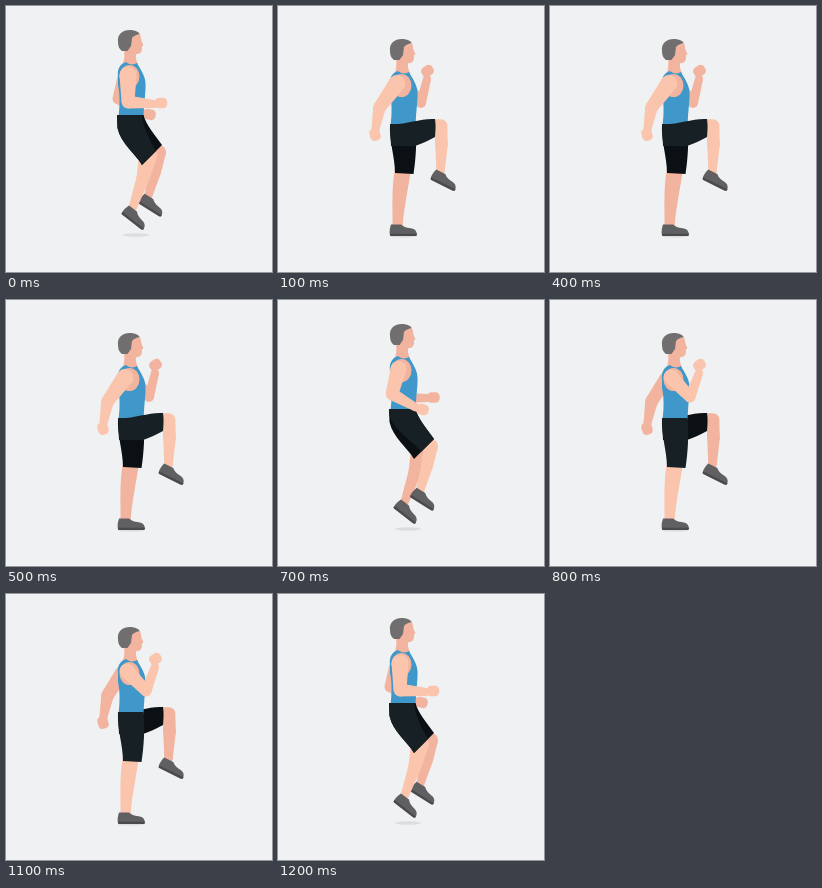
Write an HTML page with a canvas that moves like this. It is 266 by 266 pixels and loops after 1.3 s.

```html
<!DOCTYPE html>
<html lang="en">
<head>
<meta charset="utf-8">
<title>High knees</title>
<style>
  html, body { margin: 0; width: 100%; height: 100%; overflow: hidden; background: #f0f1f3; }
  canvas { display: block; width: 100vw; height: 100vh; }
</style>
</head>
<body>
<canvas id="stage"></canvas>
<script>
const SIZE = 266, LOOP = 1300;
const canvas = document.getElementById('stage');
const ctx = canvas.getContext('2d');
const C = {
  bg: '#f0f1f3', skin: '#fac4ad', farSkin: '#f2b49e', hair: '#706e6f',
  vest: '#3f98c9', shorts: '#162025', farShorts: '#0a1013',
  shoe: '#605f62', sole: '#4a494c', shadow: '#dcdddf'
};

function fill(d, color) {
  ctx.fillStyle = color;
  ctx.fill(new Path2D(d));
}

function disc(x, y, rx, ry, color) {
  ctx.fillStyle = color;
  ctx.beginPath();
  ctx.ellipse(x, y, rx, ry, 0, 0, Math.PI * 2);
  ctx.fill();
}

// Tapered limb through joints [x, y, radius]
function limb(joints, color) {
  joints.forEach(([x, y, r], i) => {
    disc(x, y, r, r, color);
    if (!i) return;
    const [px, py, pr] = joints[i - 1];
    const a = Math.atan2(y - py, x - px);
    const nx = -Math.sin(a), ny = Math.cos(a);
    ctx.beginPath();
    ctx.moveTo(px + nx * pr, py + ny * pr);
    ctx.lineTo(x + nx * r, y + ny * r);
    ctx.lineTo(x - nx * r, y - ny * r);
    ctx.lineTo(px - nx * pr, py - ny * pr);
    ctx.fill();
  });
}

function fist(x, y, color, turn = 0) {
  ctx.save();
  ctx.translate(x, y);
  ctx.rotate(turn);
  ctx.fillStyle = color;
  ctx.beginPath();
  ctx.roundRect(-6.2, -5.3, 12.4, 10.6, 4.2);
  ctx.fill();
  ctx.restore();
}

// Shoe with its heel at (x, y), toe pointing right before turning
function shoe(x, y, turn) {
  ctx.save();
  ctx.translate(x, y);
  ctx.rotate(turn);
  fill('M1 -11 L11 -11 C14 -8 18 -7.5 22 -7 C26 -6 27 -3 27 0 L0 0 C-1 -4 0 -8 1 -11 Z', C.shoe);
  fill('M0 -1.8 L27 -1.8 C27 0 26 .6 25 .6 L1 .6 C0 .6 0 -1 0 -1.8 Z', C.sole);
  ctx.restore();
}

function head() {
  fill('M117 49 L131 53 C129 59 130 63 132 67 C128 72 119 72 116 68 C119 63 119 56 117 49 Z', C.farSkin);
  fill('M119 37 L133 35.5 C135 38 135 43 136 45 L137.5 48 L136 49.5 C136 53 136 56 132 57 C127 58 120 54 118 49 Z', C.farSkin);
  fill('M112 45 C111 37 117 33 123.5 33 C128 33 132 34 133.5 37 C130 38 127 39 126 41 L125 49 L121.5 54 L116 54 C113 52 112 49 112 45 Z', C.hair);
}

function vest() {
  fill('M112 80 C111 72 114 67 120 65 C123 68 128 68 131 66 C134 72 139 78 139.5 86 C140 94 138 104 137.5 120 L112.5 120 C114 108 114 97 112 88 Z', C.vest);
  disc(123.5, 79.5, 10, 11.5, C.farSkin);
}

function frontArm(near) {
  const color = near ? C.skin : C.farSkin;
  const arm = near
    ? [[121, 77, 7.5], [140, 97, 5.5], [149, 73, 4]]
    : [[131, 82, 6], [143, 97, 5], [149, 73, 4]];
  limb(arm, color);
  fist(149.5, 65, color, -0.6);
}

function backArm(near) {
  const color = near ? C.skin : C.farSkin;
  limb([near ? [119, 77.5, 8.5] : [116, 79, 7], [101.5, 101.5, 6.3], [97.5, 123, 4]], color);
  fist(97, 128.5, color, 1.3);
}

function raisedLeg(near) {
  limb([[155, 121, 8], [163, 119.5, 6.3], [163.5, 138, 6.3], [162.5, 165, 4.2]], near ? C.skin : C.farSkin);
  shoe(152.5, 173, 0.46);
  fill('M112 118 C127 119 143 112 157 113 C158 119 157.5 125 157 131 C150 135 143 138 137 140 L113 140 Z',
    near ? C.shorts : C.farShorts);
}

function standingLeg(near) {
  fill('M117 162 L133 162 C131 180 126 199 124.5 222 L114.5 222 C115 207 113 184 117 162 Z',
    near ? C.skin : C.farSkin);
  shoe(112, 229.5, 0);
  fill('M112 118 L137.5 118 C139 134 138 152 135.5 168 L117 167 C117 151 111 135 112 118 Z',
    near ? C.shorts : C.farShorts);
}

function stand(nearRaised) {
  disc(125, 230.5, 13, 1.2, C.shadow);
  if (nearRaised) {
    frontArm(false);
    standingLeg(false);
    head();
    vest();
    raisedLeg(true);
    backArm(true);
  } else {
    backArm(false);
    raisedLeg(false);
    head();
    vest();
    standingLeg(true);
    frontArm(true);
  }
}

function rearLeg(color) {
  limb([[142, 150, 9], [137, 172, 6.5], [127, 201, 4.2]], color);
  shoe(115.5, 207.5, 0.66);
}

function leadLeg(color) {
  limb([[153, 146, 7], [149, 166, 6], [142, 191, 4]], color);
  shoe(132, 196.5, 0.56);
}

function hop(nearLead) {
  disc(130, 229, 13, 1.8, C.shadow);

  if (nearLead) {
    rearLeg(C.farSkin);
    leadLeg(C.skin);
    limb([[130, 98, 5], [149, 98, 4]], C.farSkin);
    fist(155.5, 97.5, C.farSkin);
  } else {
    leadLeg(C.farSkin);
    rearLeg(C.skin);
    limb([[117, 73, 6], [111.5, 93, 5], [136, 107, 4]], C.farSkin);
    fist(143.5, 108.5, C.farSkin, 0.2);
  }

  ctx.save();
  ctx.translate(0, -9);
  head();
  vest();
  ctx.restore();

  fill('M111 109 L137.5 109 C140 119 149 129 156 139 L136 159 C129 147 115 138 111.5 122 Z', C.farShorts);
  fill(nearLead
    ? 'M111 109 L137.5 109 C140 119 149 129 156 139 L143 152 C135 140 116 132 111 114 Z'
    : 'M111 109 L136 109 C137 122 145 136 150 145 L136 159 C129 147 115 138 111.5 122 Z', C.shorts);

  if (nearLead) {
    limb([[120.5, 69, 8], [114, 94, 6.3], [138, 107.5, 4]], C.skin);
    fist(144.5, 109.5, C.skin, 0.3);
  } else {
    limb([[122, 69, 8.5], [122, 96, 6.5], [148, 98, 4]], C.skin);
    fist(155, 97, C.skin);
  }
}

function draw(t) {
  const dpr = devicePixelRatio || 1;
  const w = Math.round(innerWidth * dpr), h = Math.round(innerHeight * dpr);
  if (canvas.width !== w || canvas.height !== h) {
    canvas.width = w;
    canvas.height = h;
  }
  ctx.setTransform(w / SIZE, 0, 0, h / SIZE, 0, 0);
  ctx.fillStyle = C.bg;
  ctx.fillRect(0, 0, SIZE, SIZE);

  if (t < 100 || t >= 1200) hop(false);
  else if (t < 600) stand(true);
  else if (t < 800) hop(true);
  else stand(false);
}

const start = performance.now();
function tick() {
  draw((performance.now() - start) % LOOP);
  requestAnimationFrame(tick);
}
tick();
</script>
</body>
</html>
```
